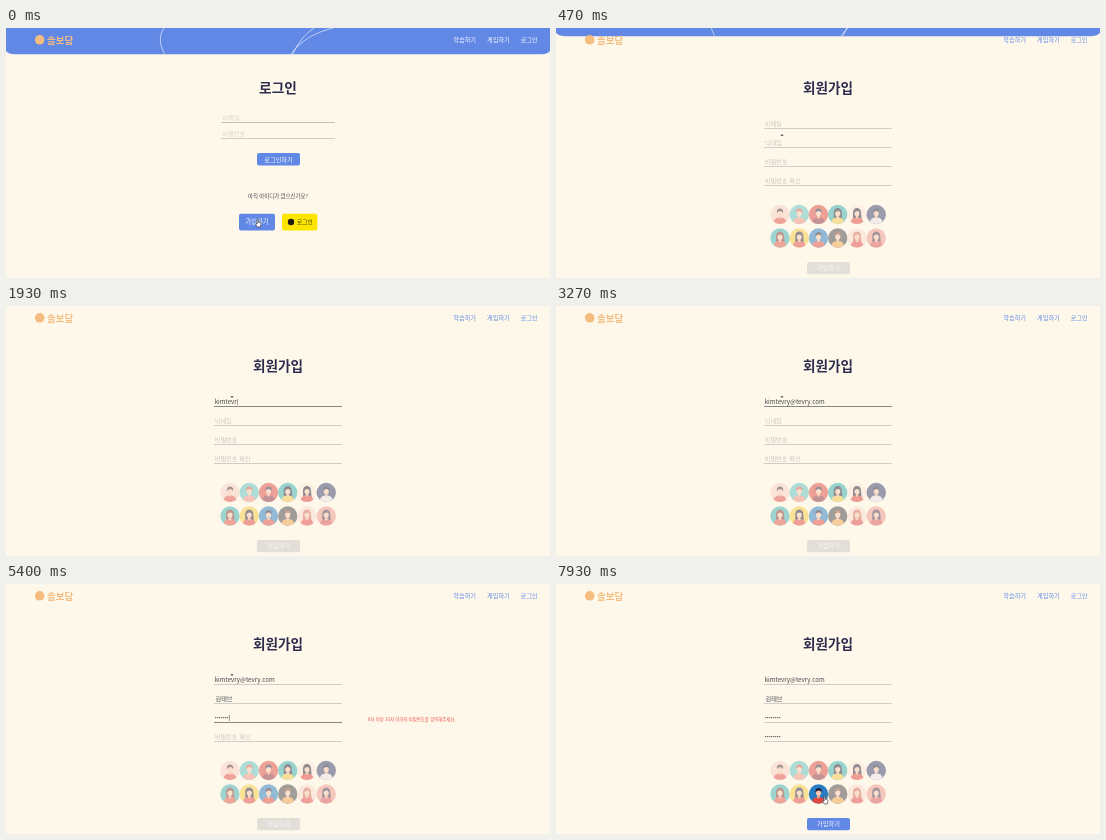
An HTML page that plays this animation: 544x250 px, repeating every 8 s.

```html
<!DOCTYPE html>
<html lang="ko">
<head>
<meta charset="utf-8">
<title>회원가입</title>
<style>
html, body { margin: 0; width: 100%; height: 100%; overflow: hidden; background: #fdf8ea; }
svg { display: block; width: 544px; height: 250px; }
text { font-family: "Noto Sans CJK KR", "Noto Sans CJK", "Noto Sans", sans-serif; white-space: pre; }
.dots { font-family: "Noto Sans", sans-serif; }
</style>
</head>
<body>
<svg id="stage" viewBox="0 0 544 250"></svg>
<script>
const LOOP = 8000, SWITCH = 150, SLIDE = 800;
const BLUE = '#6288e6', INK = '#2c2b4d', IDLE = '#cfcdca', ACTIVE = '#898785', HINT = '#c9c6bf';
const stage = document.getElementById('stage');

function el(parent, tag, attrs = {}, content) {
  const n = document.createElementNS('http://www.w3.org/2000/svg', tag);
  for (const k in attrs) n.setAttribute(k, attrs[k]);
  if (content) n.textContent = content;
  parent.appendChild(n);
  return n;
}
// cy is the optical middle of the line
const label = (p, s, x, cy, size, fill, more = {}) =>
  el(p, 'text', { x, y: cy + size * 0.37, 'font-size': size, fill, ...more }, s);
const box = (p, x, y, w, h, fill, rx = 2) => el(p, 'rect', { x, y, width: w, height: h, rx, fill });
const rule = (p, x, y, w, fill) => el(p, 'rect', { x, y, width: w, height: 1, fill });
const show = (n, on) => n.setAttribute('visibility', on ? 'visible' : 'hidden');
const MID = { 'text-anchor': 'middle' };

// header
const header = el(stage, 'g');
el(header, 'path', { d: 'M0-10H544V23Q541 26.3 536 26.3H8Q3 26.3 0 23Z', fill: BLUE });
const waves = ['M158 0C153 8 153 15 158.5 26', 'M327 0C311 4 296 11 285 26', 'M308 0C298 7 291 16 287 26'];
for (const d of waves) el(header, 'path', { d, fill: 'none', stroke: '#fff', 'stroke-width': 0.7, opacity: 0.85 });
el(stage, 'circle', { cx: 33.7, cy: 11.8, r: 4.8, fill: '#f5bc80' });
label(stage, '솔보담', 41, 12.8, 9.5, '#f5bc80', { 'font-weight': 700 });
const nav = el(stage, 'g');
[['학습하기', 447.3], ['게임하기', 481], ['로그인', 514.7]].forEach(([s, x]) => label(nav, s, x, 12, 6.2, 'inherit', { 'font-weight': 500 }));
nav.querySelectorAll('text').forEach(n => n.removeAttribute('fill'));

// login page
const login = el(stage, 'g');
label(login, '로그인', 272, 60, 13.7, INK, { ...MID, 'font-weight': 700 });
label(login, '이메일', 216.5, 90, 6.2, '#d8d4ca');
rule(login, 215, 94, 114, '#c3c1bd');
label(login, '비밀번호', 216.5, 106, 6.2, '#d8d4ca');
rule(login, 215, 110, 114, IDLE);
box(login, 251, 125, 43, 12.5, BLUE);
label(login, '로그인하기', 272.5, 131.3, 6.2, '#fff', MID);
label(login, '아직 아이디가 없으신가요?', 272, 168.3, 5.4, '#4a4854', { ...MID, 'font-weight': 500 });
box(login, 233, 185.8, 36, 16.6, BLUE);
label(login, '가입하기', 251, 194, 6.3, '#fff', MID);
box(login, 276, 185.8, 35.4, 16.6, '#fee500');
el(login, 'circle', { cx: 285, cy: 194, r: 3.2, fill: '#1e1a10' });
label(login, '로그인', 291, 194, 5.7, '#3a3410');

// sign-up page
const signup = el(stage, 'g');
label(signup, '회원가입', 272, 60, 13.6, INK, { ...MID, 'font-weight': 700 });

const mail = 'kimtevry@tevry.com';
const mailTimes = [1330, 1470, 1530, 1670, 1730, 1870, 1930, 2070, 2270, 2400, 2470, 2530, 2600, 2670, 2800, 2870, 2930, 3000];
const dots = times => times.map((t, i) => [t, '•'.repeat(i + 1)]);
const fields = [
  { hint: '이메일', y: 96, focus: [600, 3330], steps: mailTimes.map((t, i) => [t, mail.slice(0, i + 1)]) },
  { hint: '닉네임', y: 115, focus: [3330, 4470], dx: 0.8,
    steps: [[3470, 'ㄱ'], [3530, '기'], [3670, '김'], [3730, '김ㅌ'], [3800, '김테'], [4000, '김텝'], [4070, '김테브']] },
  { hint: '비밀번호', y: 134, focus: [4470, 5800], secret: true,
    steps: dots([4730, 4930, 5000, 5130, 5270, 5330, 5400, 5530]),
    error: [4730, 5530, 362, '8자 이상 16자 이하의 비밀번호를 입력해주세요.'] },
  { hint: '비밀번호 확인', y: 153, focus: [5800, 7000], secret: true,
    steps: dots([5930, 6070, 6200, 6330, 6470, 6530, 6670, 6740]),
    error: [5930, 6740, 363, '비밀번호가 일치하지 않습니다'] }
];
for (const f of fields) {
  f.line = rule(signup, 208, f.y + 4, 128, IDLE);
  f.ph = label(signup, f.hint, 208.7, f.y, 6.2, HINT);
  f.x = 208.7 + (f.dx || 0);
  f.text = label(signup, '', f.x, f.y, f.secret ? 5.3 : 6.15, '#45434a', f.secret ? { class: 'dots' } : {});
  f.caret = el(signup, 'rect', { y: f.y - 3, width: 0.6, height: 6, fill: '#444' });
  if (f.error) f.msg = label(signup, f.error[3], f.error[2], f.y + 1.8, 4.43, '#ee5656', { 'font-weight': 500 });
}

// avatars: backdrop, hair, shirt, long hair
const people = [
  ['#f9d0c6', '#4a2f38', '#e5504f', 0], ['#62c2c4', '#d9574f', '#f2908a', 0], ['#dd4a45', '#2f2b4a', '#8c3148', 0],
  ['#35b0b2', '#26243c', '#f2c54a', 1], ['#fdeadb', '#23213a', '#e0403f', 1], ['#3a4272', '#232340', '#e9e4ea', 0],
  ['#3fb2b5', '#7b3c3c', '#e4554f', 1], ['#f6cb42', '#2a2540', '#e1484c', 1], ['#2a7cc2', '#262038', '#e14a42', 0],
  ['#45434d', '#8c4a34', '#f0a14a', 0], ['#fadcd2', '#d8685a', '#e2484c', 1], ['#f19a92', '#4b3550', '#d9525a', 1]
];
const faces = people.map(([back, hair, shirt, long], i) => {
  const x = 224 + (i % 6) * 19.25, y = i < 6 ? 186.5 : 210;
  const g = el(signup, 'g', { transform: `translate(${x} ${y})` });
  el(g, 'circle', { r: 9.7, fill: back });
  if (long) el(g, 'path', { d: 'M-4 4V-2A4 4.6 0 0 1 4-2L4.6 5Z', fill: hair });
  el(g, 'path', { d: 'M-6.3 7.3Q-5.5 3 0 2.7Q5.5 3 6.3 7.3A9.7 9.7 0 0 1-6.3 7.3Z', fill: shirt });
  el(g, 'path', { d: 'M-1.2 0H1.2V3.2L0 4.4L-1.2 3.2Z', fill: '#f3b49c' });
  el(g, 'ellipse', { cy: -1.4, rx: 2.6, ry: 3.2, fill: '#f8c7b0' });
  el(g, 'path', { d: 'M-3-1.2Q-3.8-6 .4-6Q4-5.6 3-1.2Q2.4-3.4 0-3.4Q-2.2-3.2-3-1.2Z', fill: hair });
  return g;
});
const submit = box(signup, 251, 234, 43, 12.3, BLUE);
const submitText = label(signup, '가입하기', 272.5, 240.2, 6.2, '#fff', MID);

// pointer
const pointer = el(stage, 'g');
const shapes = {};
for (const k of ['hand', 'tip', 'beam', 'arrow']) shapes[k] = el(pointer, 'g');
const outline = { fill: '#fff', stroke: '#222', 'stroke-width': 0.6, 'stroke-linejoin': 'round' };
el(shapes.hand, 'path', { d: 'M-.9-3.6Q-.1-4.5 .5-3.6V-.8L2.6-.2Q3.2.2 2.9 1.5L2.3 4H-.6L-2.5 1.2Q-2.4.2-.9 1Z', ...outline });
el(shapes.tip, 'rect', { x: -1.2, y: -0.7, width: 2.4, height: 1.1, fill: '#333' });
el(shapes.beam, 'path', { d: 'M-1.3-2.8H1.1M0-2.8V2.8M-.6 2.8H.8', stroke: '#222', 'stroke-width': 0.9, fill: 'none' });
el(shapes.arrow, 'path', { d: 'M0-3V3L1.4 1.8L2.4 3.8L3.2 3.4L2.3 1.5H4Z', ...outline });
const path = [
  [0, 252, 195, 'hand'], [150, 252, 195, 'tip'], [260, 226, 114, 'tip'], [400, 226, 114, 'tip'], [600, 226, 91, 'tip'],
  [6180, 226, 91, 'beam'], [6330, 236, 149.5, 'beam'], [6530, 236, 150, 'beam'], [6680, 236, 150, 'arrow'],
  [7000, 376, 178, 'arrow'], [7200, 376, 178, 'hand'], [7470, 293, 216, 'hand'], [7610, 293, 216, 'hand'],
  [7730, 269, 216, 'hand'], [LOOP, 269, 216, 'hand']
];

// cubic-bezier(.25, .1, .25, 1)
function ease(p) {
  if (p <= 0 || p >= 1) return p <= 0 ? 0 : 1;
  const at = (a, b, u) => 3 * a * u * (1 - u) ** 2 + 3 * b * u * u * (1 - u) + u ** 3;
  let lo = 0, hi = 1;
  for (let i = 0; i < 20; i++) {
    const m = (lo + hi) / 2;
    if (at(0.25, 0.25, m) < p) lo = m; else hi = m;
  }
  return at(0.1, 1, lo);
}

function drawField(f, t) {
  const on = t >= f.focus[0] && t < f.focus[1];
  let value = '', last = -1000;
  for (const [at, s] of f.steps) if (t >= at) { value = s; last = at; }
  if (f.text.textContent !== value) f.text.textContent = value;
  f.line.setAttribute('fill', on ? ACTIVE : IDLE);
  f.ph.setAttribute('opacity', value ? 0 : 1);
  const blink = on && t - last < 180;
  f.caret.setAttribute('opacity', blink ? 0.8 : 0);
  if (blink) f.caret.setAttribute('x', f.x + f.text.getComputedTextLength() + 0.4);
  if (f.msg) f.msg.setAttribute('opacity', t >= f.error[0] && t < f.error[1] ? 1 : 0);
}

function draw(ms) {
  const t = ms + 8; // small lead so that steps land on time
  const joined = t >= SWITCH;
  show(login, !joined);
  show(signup, joined);
  nav.setAttribute('fill', joined ? BLUE : '#fff');
  header.setAttribute('transform', `translate(0 ${-26.5 * ease((ms - SWITCH) / SLIDE)})`);
  fields.forEach(f => drawField(f, t));

  const picked = t >= 7930;
  faces.forEach((g, i) => g.setAttribute('opacity', picked && i === 8 ? 1 : 0.5));
  submit.setAttribute('fill', picked ? BLUE : '#e2dfd8');
  submitText.setAttribute('fill', picked ? '#fff' : '#fbf9f3');

  let i = 0;
  while (i < path.length - 2 && ms >= path[i + 1][0]) i++;
  const [t0, x0, y0, kind] = path[i], [t1, x1, y1] = path[i + 1];
  const p = Math.min(1, (ms - t0) / (t1 - t0)), k = p * p * (3 - 2 * p);
  pointer.setAttribute('transform', `translate(${x0 + (x1 - x0) * k} ${y0 + (y1 - y0) * k})`);
  for (const s in shapes) show(shapes[s], s === kind);
}

const start = performance.now();
function tick() {
  draw((performance.now() - start) % LOOP);
  requestAnimationFrame(tick);
}
tick();
</script>
</body>
</html>
```
